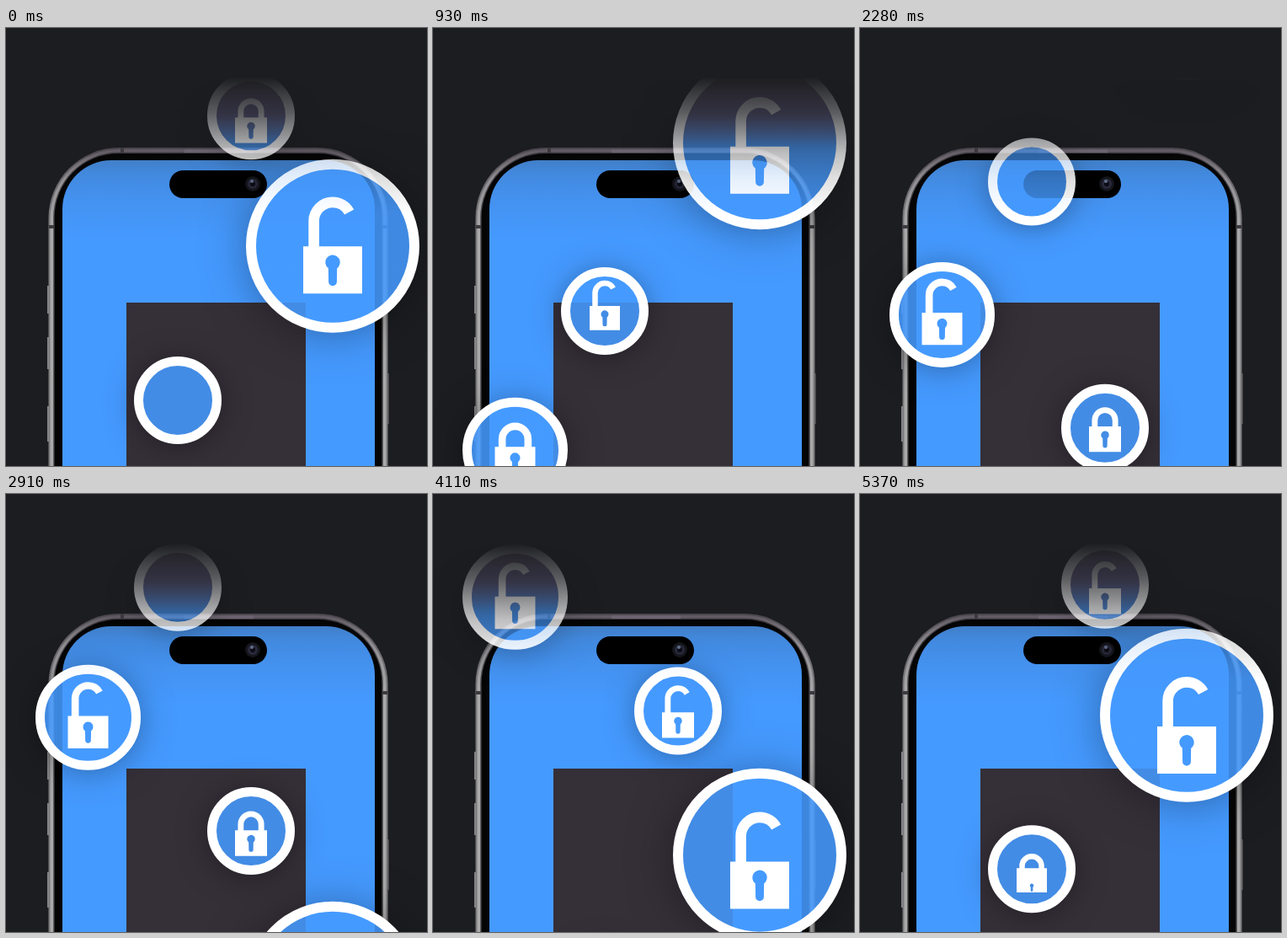
Animation, 500 px wide and 520 px high, one loop 5400 ms. Source, as an HTML page with a canvas:

```html
<!DOCTYPE html>
<html lang="en">
<head>
<meta charset="utf-8">
<title>Locks rising over a phone</title>
<style>
  html, body { margin: 0; width: 100%; height: 100%; overflow: hidden; background: #1c1d21; }
  canvas { display: block; }
</style>
</head>
<body>
<canvas id="stage" width="500" height="520"></canvas>
<script>
const W = 500, H = 520, LOOP = 5400;
const stage = document.getElementById('stage').getContext('2d');

function makeLayer() {
  const canvas = document.createElement('canvas');
  canvas.width = W;
  canvas.height = H;
  return canvas.getContext('2d');
}
const phone = makeLayer(), layer = makeLayer();

// Vertical gradient in stage coordinates; stops are [y, colour].
function vertical(stops) {
  const g = stage.createLinearGradient(0, 0, 0, H);
  for (const [y, colour] of stops) g.addColorStop(y / H, colour);
  return g;
}

const fade = vertical([[58, '#0000'], [75, 'rgba(0,0,0,.12)'], [100, 'rgba(0,0,0,.28)'],
  [135, 'rgba(0,0,0,.6)'], [150, 'rgba(0,0,0,.72)'], [180, 'rgba(0,0,0,.87)'], [220, '#000']]);
const glass = vertical([[70, 'rgba(145,115,155,.87)'], [105, 'rgba(115,115,170,.87)'],
  [140, 'rgba(69,154,255,.87)']]);

function roundBox(c, left, top, right, radius, fill) {
  c.beginPath();
  c.roundRect(left, top, right - left, 700, radius);
  c.fillStyle = fill;
  c.fill();
}

function dot(c, x, y, r, fill) {
  c.beginPath();
  c.arc(x, y, r, 0, 7);
  c.fillStyle = fill;
  c.fill();
}

function drawPhone(c) {
  c.fillStyle = '#1c1d21';
  c.fillRect(0, 0, W, H);

  // Side buttons
  c.fillStyle = '#88868a';
  for (const [x, y, h] of [[49, 306, 33], [49, 367, 38], [49, 449, 42]]) c.fillRect(x, y, 3, h);
  c.fillStyle = '#4a484c';
  c.fillRect(453, 410, 2, 60);

  // Metal frame, bezel, screen
  roundBox(c, 50.5, 142, 453.5, 84, vertical([[142, '#4b464e'], [180, '#6b696d'], [240, '#7c7b7d']]));
  roundBox(c, 52.5, 144, 451.5, 82, vertical([[142, '#5d5660'], [180, '#918f92'], [240, '#aaa9aa']]));
  roundBox(c, 56, 147.5, 448, 78, vertical([[142, '#3a363d'], [240, '#5a595b']]));
  roundBox(c, 57.5, 149, 446.5, 76, '#050506');
  roundBox(c, 67, 157, 438, 58, vertical([[157, '#417fc9'], [175, '#428ae0'], [205, '#4492f0'], [250, '#459aff']]));

  // Antenna breaks
  c.fillStyle = '#3c3a3e';
  c.fillRect(51, 234, 6, 4);
  c.fillRect(447, 234, 6, 4);
  c.fillRect(136, 142, 4, 6);
  c.fillStyle = '#6c6470';
  c.fillRect(212, 144, 82, 4);

  // Camera island
  c.beginPath();
  c.roundRect(194, 169, 116, 33, 16.5);
  c.fillStyle = '#000';
  c.fill();
  dot(c, 293, 185, 9, '#15161c');
  dot(c, 293, 185, 6, '#29293c');
  dot(c, 293, 185, 3, '#0b0c14');
  dot(c, 292, 182, 2, '#62708c');

  c.fillStyle = '#352f38';
  c.fillRect(143, 326, 213, 194);
}

// enter: time the disc starts below the stage; speed in px/ms.
// shift: lock offset [before, after] the entry, drift: its change per ms.
// early: how far the lock is open while a disc carries over the loop point.
const discs = [
  { x: 204, r: 52, w: 36, ring: 11, enter: 4082, speed: .1138, opens: 5480, early: 1, shift: [-6, -1], drift: 0, shown: [400, 1250] },
  { x: 291, r: 52, w: 38, ring: 11, enter: 1295, speed: .1188, opens: 2900, early: 0, shift: [2, -6.5], drift: .002 },
  { x: 97.5, r: 62.5, w: 48, ring: 11, enter: 82, speed: .1192, opens: 1800, early: 1, shift: [-5, -5], drift: .0011 },
  { x: 388, r: 103, w: 70, ring: 12, enter: 2484, speed: .1317, opens: 3780, early: 1, shift: [.5, -10], drift: .0043 }
];

const clamp = v => Math.max(0, Math.min(1, v));
const ease = v => (v = clamp(v), v * v * (3 - 2 * v));

// Lock of unit width; the origin is the middle of the body's top edge.
function drawLock(c, x, y, w, open, press, scale) {
  c.save();
  c.translate(x, y + w * .4);
  c.scale(w * scale, w * scale);
  c.translate(0, -.4);
  c.fillStyle = c.strokeStyle = '#fff';

  const r = .32, top = -(.6 + .24 * open - .12 * press) + .09 + r;
  c.lineWidth = .18;
  c.beginPath();
  c.moveTo(-r, .05);
  c.lineTo(-r, top);
  c.arc(0, top, r, Math.PI, -.5 * open);
  if (open < 1) c.lineTo(r, top + (.05 - top) * (1 - open));
  c.stroke();

  // Body with the keyhole cut out
  const size = 1 - .5 * press, hole = .27 + .3 * press, foot = hole + .33 * size;
  c.beginPath();
  c.rect(-.5, 0, 1, .8);
  c.moveTo(-.07 * size, foot);
  c.arc(0, hole, .125 * size, 2.2, .94);
  c.arc(0, foot, .07 * size, 0, Math.PI);
  c.closePath();
  c.fill('evenodd');
  c.restore();
}

function drawDisc(c, d, t) {
  const age = (t - d.enter + LOOP) % LOOP;
  const y = H + 20 + d.r - d.speed * age;
  if (y + d.r < 40) return;

  // Shadow only outside the glass
  c.save();
  c.beginPath();
  c.rect(0, 0, W, H);
  c.moveTo(d.x + d.r - 1, y);
  c.arc(d.x, y, d.r - 1, 0, 7);
  c.clip('evenodd');
  c.shadowColor = 'rgba(0,0,0,.34)';
  c.shadowBlur = d.r * .35 + 16;
  c.shadowOffsetY = 3;
  dot(c, d.x, y, d.r - 1, '#000');
  c.restore();

  dot(c, d.x, y, d.r - d.ring + 1, glass);
  c.beginPath();
  c.arc(d.x, y, d.r - d.ring / 2, 0, 7);
  c.lineWidth = d.ring;
  c.strokeStyle = '#fff';
  c.stroke();

  const late = t >= d.enter;
  const open = late ? ease((t - d.opens) / 250) : d.early;
  const press = late ? ease(1 - Math.abs(t - d.opens + 110) / 110) : 0;
  let scale = 1;
  if (!late && d.shown) scale = ease((t - d.shown[0]) / 200) * ease((d.shown[1] - t) / 150);
  if (scale > 0) drawLock(c, d.x, y + d.shift[+late] + d.drift * t, d.w, open, press, scale);
}

function frame(now) {
  const t = now % LOOP;
  layer.globalCompositeOperation = 'source-over';
  layer.clearRect(0, 0, W, H);
  for (const d of discs) drawDisc(layer, d, t);
  layer.globalCompositeOperation = 'destination-in';
  layer.fillStyle = fade;
  layer.fillRect(0, 0, W, H);

  stage.drawImage(phone.canvas, 0, 0);
  stage.drawImage(layer.canvas, 0, 0);
}

drawPhone(phone);
const start = performance.now();
function tick() {
  frame(performance.now() - start);
  requestAnimationFrame(tick);
}
tick();
</script>
</body>
</html>
```
